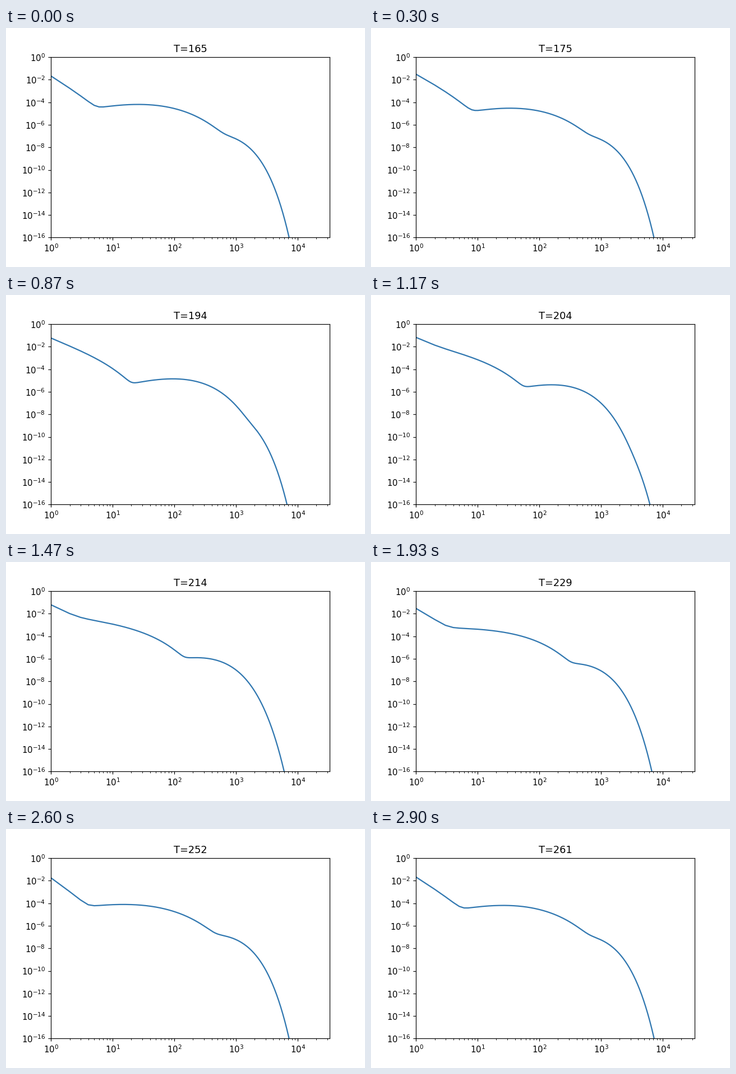
Recreate the animation shown at these times as a matplotlib script. Size 640x427 px, loop 2.93 s.

```python
import numpy as np
import matplotlib.pyplot as plt
from matplotlib.animation import FuncAnimation
from matplotlib.ticker import NullLocator

W, H, DPI = 640, 427, 106.75
LOOP, FRAMES = 2930, 89
T0, T1 = 165, 261
PERIOD = 96          # a new wave is born every PERIOD units of T
SHARP = 2            # how crisply one wave takes over from the next

# Life of one wave: age, level, reach of its cutoff (both log10).
LIFE = np.array([
    (-192, -3.0, 2.40), (-163, -1.25, 2.40), (-145, -1.10, 2.40),
    (-115, -1.66, 2.40), (-96, -1.55, 2.33), (-77, -1.22, 2.14),
    (-47, -1.98, 3.16), (-32, -3.16, 3.50), (0, -4.81, 3.635),
    (19, -6.21, 3.69), (49, -9.33, 3.858), (77, -10.67, 3.966),
    (96, -10.85, 3.979), (115, -11.09, 3.977), (192, -21.0, 3.977),
])

sizes = np.unique(np.geomspace(1, 9000, 600).astype(int))
u = np.log10(sizes)


def hermite(x, y, q):
    """Smooth curve through the points (x, y), evaluated at q."""
    m = np.gradient(y, x, axis=0, edge_order=2)
    i = np.clip(np.searchsorted(x, q) - 1, 0, len(x) - 2)
    h = x[i + 1] - x[i]
    t = (q - x[i]) / h
    s = 1 - t
    return (s * s * (1 + 2 * t) * y[i] + t * t * (3 - 2 * t) * y[i + 1]
            + h * t * s * (s * m[i] - t * m[i + 1]))


def wave(age):
    """log10 of one wave: a power law with a stretched exponential cutoff."""
    level, reach = hermite(LIFE[:, 0], LIFE[:, 1:], age)
    slope = np.interp(age, [-145, -105, 0], [-2.4, -3.7, 1.9])
    stretch = 0.9 - 0.5 * np.exp(-(age / 40) ** 2)
    return level + slope * u - 16 * 10 ** (stretch * (u - reach))


def spectrum(time):
    ages = time - T0 + PERIOD * np.arange(-2, 2)
    total = sum(10 ** (SHARP * wave(age)) for age in ages)
    return total ** (1 / SHARP)


fig = plt.figure(figsize=(W / DPI, H / DPI), dpi=DPI, facecolor="white")
left, right, top, bottom = 80.4, 576.9, 52.1, 374.4
ax = fig.add_axes([left / W, 1 - bottom / H,
                   (right - left) / W, (bottom - top) / H])
ax.set_xscale("log")
ax.set_yscale("log")
ax.set_xlim(1, 2 ** 15)
ax.set_ylim(1e-16, 1)
ax.set_yticks(10.0 ** np.arange(-16, 1, 2))
ax.yaxis.set_minor_locator(NullLocator())
line, = ax.plot([], [], color="#3077b0", lw=1.5)
title = ax.set_title("")


def update(i):
    # The count ends just before the loop does and holds there.
    time = round(T0 + (T1 - T0) * min(i / (FRAMES - 2), 1))
    line.set_data(sizes, spectrum(time))
    title.set_text(f"T={time}")
    return line, title


anim = FuncAnimation(fig, update, frames=FRAMES, interval=LOOP / FRAMES,
                     repeat=True, repeat_delay=0)
plt.show()
```
